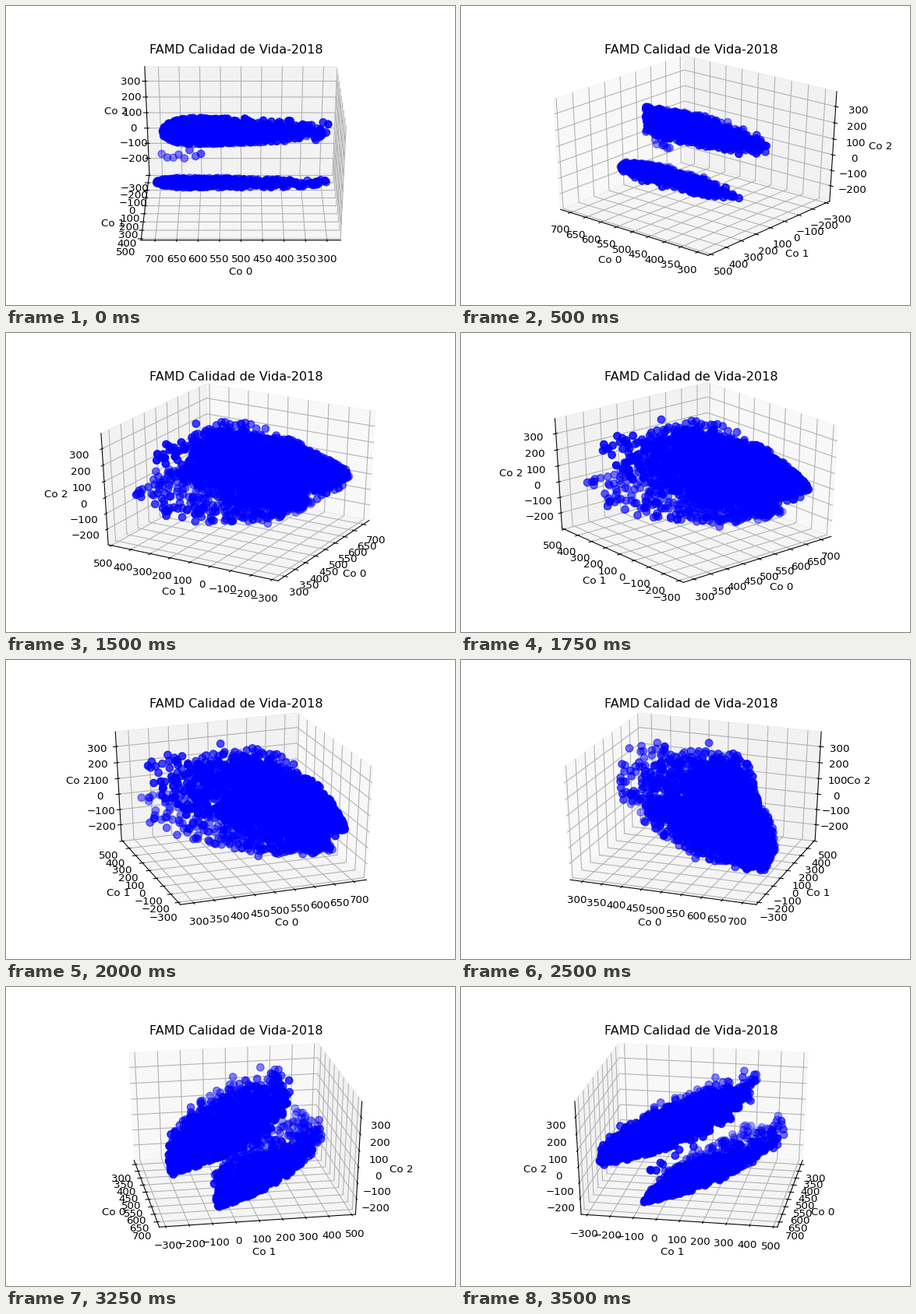
A matplotlib script for the animation above (3.75 s loop, 576 by 384 pixels).

```python
import numpy as np
import matplotlib.pyplot as plt
from matplotlib.animation import FuncAnimation
from mpl_toolkits.mplot3d import Axes3D

FRAMES, INTERVAL = 15, 250
ELEV, START, STEP = 30, 90, 20
SLOPE = 0.477  # both clouds rise with the second component


class WideAxes3D(Axes3D):
    """3D axes that fill their rectangle instead of shrinking to a square."""

    def apply_aspect(self, position=None):
        pass


def cloud(rng, n, x_max, y_low, y_high, height, thickness):
    """Slanted slab, dense at high x and thinning out towards low x."""
    tail = rng.random(n) < 0.04
    t = np.where(tail, rng.uniform(0.5, 1, n), rng.beta(1.1, 3, n))
    x = x_max - (x_max - 297) * t
    low = y_low + 305 * t ** 2.5
    high = y_high + 390 * (1 - (1 - t) ** 5)
    y = low + (high - low) * rng.beta(1.15, 1.15, n)
    half = thickness * (1 - np.exp(-0.2 - 15 * t)) * (1 - 0.4 * t)
    spread = np.clip(rng.normal(0, 0.5, n), -1, 1)
    return np.column_stack([x, y, SLOPE * y + height + half * spread])


def strays(rng, n=8):
    """A few loose points between the two clouds."""
    x = np.linspace(692, 595, n)
    y = -60 + 1.6 * (692 - x) + rng.normal(0, 25, n)
    return np.column_stack([x, y, SLOPE * y + rng.normal(-20, 18, n)])


def make_points():
    rng = np.random.default_rng(2018)
    upper = cloud(rng, 1900, 690, -255, -70, height=127, thickness=88)
    lower = cloud(rng, 950, 705, -65, 75, height=-197, thickness=32)
    return np.vstack([upper, lower, strays(rng)])


fig = plt.figure(figsize=(6, 4), dpi=96)
ax = fig.add_axes(WideAxes3D(fig, [0.125, 0.125, 0.775, 0.755]))
ax.scatter(*make_points().T, c="blue", s=50, marker="o")

ax.set_xlim(268, 733, view_margin=0)
ax.set_ylim(-327, 517, view_margin=0)
ax.set_zlim(-302, 391, view_margin=0)
ax.set_xticks(range(300, 701, 50))
ax.set_yticks(range(-300, 501, 100))
ax.set_zticks(range(-200, 301, 100))
ax.set_xlabel("Co 0")
ax.set_ylabel("Co 1")
ax.set_zlabel("Co 2")

# An even cube, with the zoom undoing the built-in scaling.
ax.set_box_aspect((1, 1, 1), zoom=3 ** 0.5 / 1.8294640721620434)
fig.text(295.2 / 576, 1 - 61.3 / 384, "FAMD Calidad de Vida-2018",
         fontsize=12, ha="center", va="baseline")


def update(i):
    azim = START + STEP * i
    # A tiny nudge keeps the side wall at low x in the edge-on views.
    ax.view_init(elev=ELEV, azim=azim - 0.01 * np.sin(np.radians(azim)))
    return []


anim = FuncAnimation(fig, update, frames=FRAMES, interval=INTERVAL,
                     repeat=True, blit=False)
plt.show()
```
